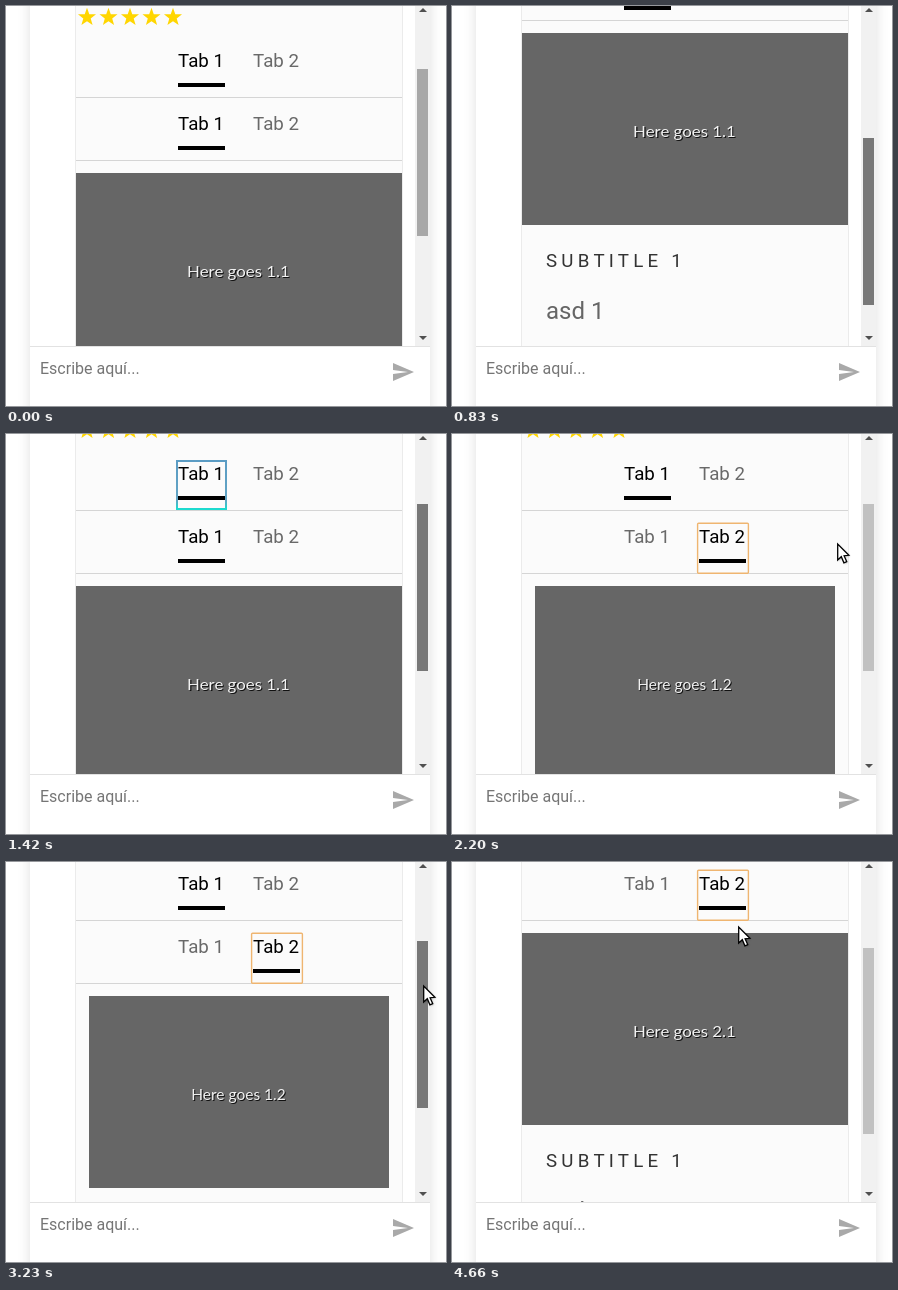
Recreate the animation shown at these times as an HTML page with a canvas. Size 440 by 400 pixels, loop 4760 ms.

```html
<!DOCTYPE html>
<html lang="es">
<head>
<meta charset="utf-8">
<style>
html, body { margin: 0; width: 100%; height: 100%; overflow: hidden; background: #fff; }
canvas { display: block; }
</style>
</head>
<body>
<canvas id="stage" width="440" height="400"></canvas>
<script>
const ctx = document.getElementById('stage').getContext('2d');
const LOOP = 4760;
const INNER_CLICK = 1740, OUTER_CLICK = 3760;

// Keyframes: [time, value, ...]
const scrollKeys = [[350, 0], [830, 140], [900, 143], [1420, 15], [2440, 15], [2620, 140],
  [2680, 132], [2730, 105], [2770, 65], [2930, 40], [3200, 33]];
const cursorKeys = [[1740, 264, 108], [1880, 270, 110], [2200, 385, 109], [2260, 389, 110],
  [2420, 415, 117], [2440, 415, 117], [2620, 414, 179], [2680, 414, 176], [2730, 415, 163],
  [2770, 416, 143], [2930, 418, 129], [3230, 417, 123], [3310, 405, 110], [3720, 271, 28],
  [3840, 271, 28], [4140, 428, 112], [4220, 428, 120], [4380, 417, 116], [4500, 417, 116], [4660, 286, 64]];
const thumbKeys = [[0, '#a8a8a8'], [350, '#787878'], [1480, '#a8a8a8'], [1520, '#c1c1c1'],
  [2400, '#a8a8a8'], [2440, '#787878'], [3270, '#a8a8a8'], [3310, '#c1c1c1'], [4090, '#a8a8a8'],
  [4140, '#c1c1c1'], [4300, '#a8a8a8'], [4580, '#c1c1c1']];

const lastIndex = (keys, t) => Math.max(0, keys.findLastIndex(k => k[0] <= t));

function tween(keys, t, field = 1) {
  const i = lastIndex(keys, t), a = keys[i], b = keys[i + 1];
  if (!b || t <= a[0]) return a[field];
  const p = (t - a[0]) / (b[0] - a[0]);
  return a[field] + (b[field] - a[field]) * (1 - Math.cos(Math.PI * p)) / 2;
}

function rect(x, y, w, h, color) {
  ctx.fillStyle = color;
  ctx.fillRect(x, y, w, h);
}

function text(str, x, y, size, color, family = 'Roboto', spacing = 0) {
  ctx.font = `${size}px ${family}, sans-serif`;
  ctx.letterSpacing = spacing + 'px';
  ctx.fillStyle = color;
  ctx.fillText(str, x, y);
}

function polygon(points, color) {
  ctx.beginPath();
  points.forEach(([x, y]) => ctx.lineTo(x, y));
  ctx.closePath();
  ctx.fillStyle = color;
  ctx.fill();
}

function star(cx, cy) {
  polygon(Array.from({ length: 10 }, (_, i) => {
    const r = i % 2 ? 3.9 : 9.5, a = i * Math.PI / 5;
    return [cx + r * Math.sin(a), cy - r * Math.cos(a)];
  }), '#ffd600');
}

function tabBar(bottom, selected) {
  rect(70, bottom, 326, 1, '#d5d5d5');
  [172, 247].forEach((x, i) => {
    const active = i === selected;
    text('Tab ' + (i + 1), x, bottom - 30, 18.72, active ? '#000' : '#696969');
    if (active) rect(x, bottom - 14, 47, 4, '#000');
  });
}

function orangeRing(bottom) {
  ctx.strokeStyle = '#efb570';
  ctx.lineWidth = 1.4;
  ctx.beginPath();
  ctx.roundRect(245.6, bottom - 49.8, 50.8, 50, 1);
  ctx.stroke();
}

function blueRing(bottom) {
  const fade = ctx.createLinearGradient(0, bottom - 50, 0, bottom);
  fade.addColorStop(0, '#5b9cc4');
  fade.addColorStop(0.8, '#62a4c4');
  fade.addColorStop(1, '#14e0d0');
  ctx.strokeStyle = fade;
  ctx.lineWidth = 2;
  ctx.strokeRect(171, bottom - 49, 49, 48);
}

function picture(top, label, width) {
  ctx.save();
  ctx.translate(233, top);
  ctx.scale(width / 300, 1);
  rect(-150, 0, 300, 192, '#666');
  ctx.textAlign = 'center';
  text(label, 0.5, 105, 15.5, '#111', 'Lato');
  text(label, -0.5, 104, 15.5, '#f2f2f2', 'Lato');
  ctx.restore();
}

function panel(top, label, width, subtitle, body) {
  picture(top, label, width);
  text(subtitle, 94, top + 234, 18.72, '#333', 'Roboto', 4.25);
  text(body, 94, top + 286, 24, '#666');
}

function content(t, scroll) {
  const outer = t >= OUTER_CLICK, inner = t >= INNER_CLICK;
  const bar1 = 91 - scroll, bar2 = 154 - scroll;
  rect(69, 0, 328, 340, '#ebebeb');
  rect(70, 0, 326, 340, '#fbfbfb');
  for (let i = 0; i < 5; i++) star(81 + i * 21.5, 11.3 - scroll);
  tabBar(bar1, +outer);
  if (outer) {
    panel(bar1 + 13, 'Here goes 2.1', 326, 'SUBTITLE 1', 'asd 1');
    orangeRing(bar1);
    return;
  }
  tabBar(bar2, +inner);
  if (inner) {
    panel(bar2 + 13, 'Here goes 1.2', 300, 'SUBTITLE 2', 'a 2');
    orangeRing(bar2);
  } else {
    panel(bar2 + 13, 'Here goes 1.1', 326, 'SUBTITLE 1', 'asd 1');
    if (t >= 910) blueRing(bar1);
  }
}

function scrollbar(t, scroll) {
  const ratio = t >= OUTER_CLICK ? 0.547 : 0.4912;
  rect(409, 0, 15, 340, '#f1f1f1');
  polygon([[413, 6], [421, 6], [417, 2]], '#505050');
  polygon([[413, 330], [421, 330], [417, 334]], '#505050');
  rect(411, Math.round(17 + (93.6 + scroll) * ratio), 11, Math.round(340 * ratio),
    thumbKeys[lastIndex(thumbKeys, t)][1]);
}

function footer() {
  rect(24, 340, 400, 60, '#fff');
  rect(24, 340, 400, 1, '#e2e2e2');
  text('Escribe aquí...', 34, 368, 16, '#757575');
  ctx.save();
  ctx.translate(385, 354);
  polygon([[2, 21], [23, 12], [2, 3], [2, 10], [17, 12], [2, 14]], '#a9a9a9');
  ctx.restore();
}

function cursor(x, y) {
  ctx.save();
  ctx.translate(x + 0.7, y + 1);
  ctx.shadowColor = 'rgba(0,0,0,.3)';
  ctx.shadowBlur = 2;
  ctx.shadowOffsetX = ctx.shadowOffsetY = 1;
  polygon([[0, 0], [0, 16], [3.6, 12.7], [6.2, 18.8], [9, 17.6], [6.4, 11.7], [11.2, 11.3]], '#fff');
  ctx.shadowColor = 'transparent';
  ctx.strokeStyle = '#000';
  ctx.lineWidth = 1.3;
  ctx.stroke();
  ctx.restore();
}

function draw(t) {
  const scroll = Math.round(tween(scrollKeys, t));
  rect(0, 0, 440, 400, '#fff');
  ctx.save();
  ctx.shadowColor = 'rgba(0,0,0,.13)';
  ctx.shadowBlur = 12;
  rect(24, -20, 400, 440, '#fff');
  ctx.restore();

  ctx.save();
  ctx.beginPath();
  ctx.rect(24, 0, 400, 340);
  ctx.clip();
  content(t, scroll);
  scrollbar(t, scroll);
  ctx.restore();

  footer();
  if (t >= INNER_CLICK) {
    cursor(Math.round(tween(cursorKeys, t)), Math.round(tween(cursorKeys, t, 2)));
  }
}

const start = performance.now();
function tick() {
  draw((performance.now() - start) % LOOP);
  requestAnimationFrame(tick);
}
tick();
</script>
</body>
</html>
```
